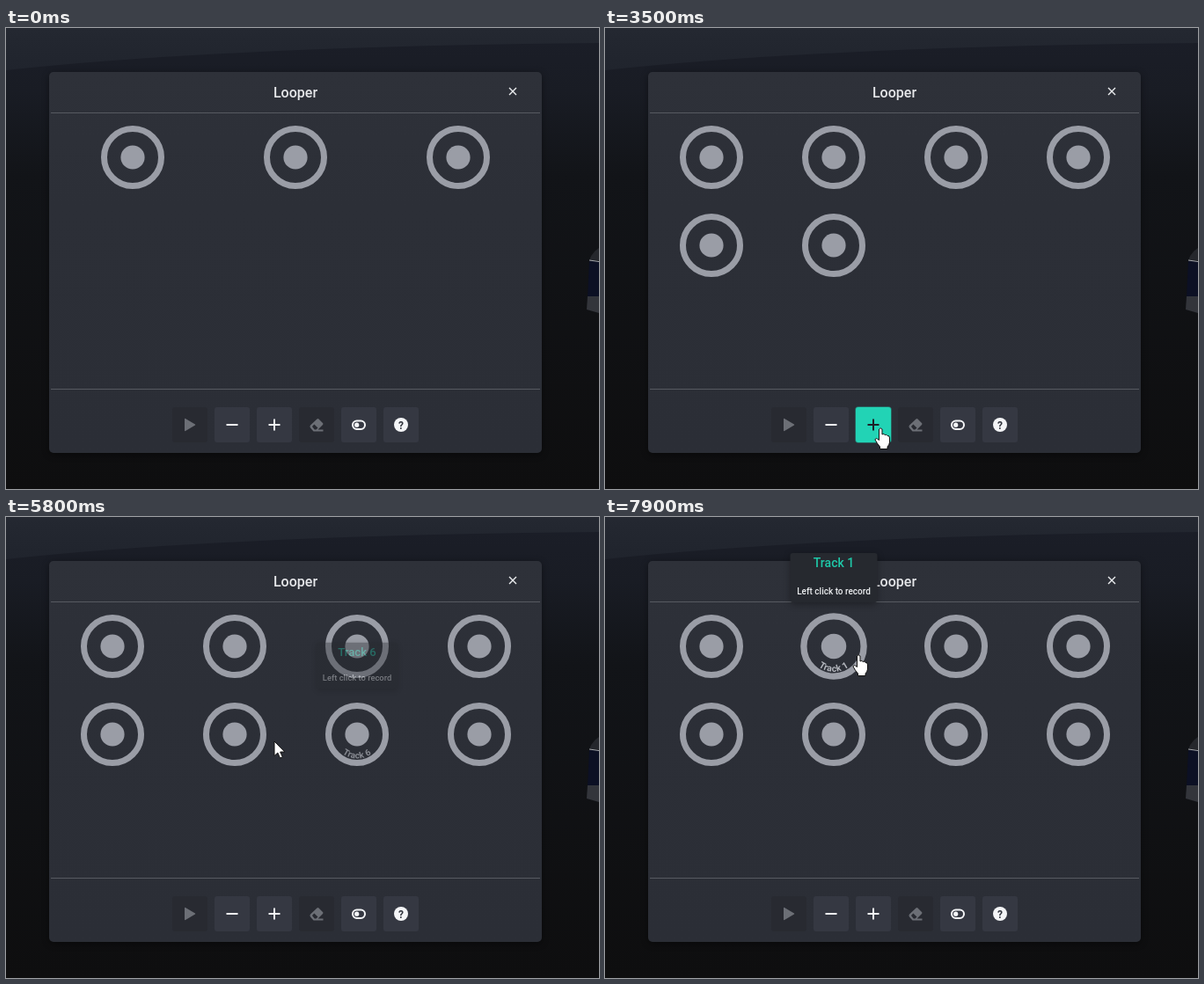
An HTML page for the animation above (8 s loop, 674 by 524 pixels).

```html
<!DOCTYPE html>
<html lang="en">
<head>
<meta charset="utf-8">
<title>Looper</title>
<style>
  html, body { margin: 0; width: 100%; height: 100%; overflow: hidden; background: #0f1011; }
  svg { display: block; width: 674px; height: 524px; font: 500 14px Roboto, sans-serif; }
  text { text-anchor: middle; }
  .ring { stroke: #9a9da6; stroke-width: 7; fill: none; }
  .label { font-size: 10px; font-weight: 700; letter-spacing: .3px; fill: #b4b7be; }
  .icon { stroke: #f4f5f7; stroke-width: 2; fill: none; }
  .off { fill: #6c6f76; }
</style>
</head>
<body>
<svg viewBox="0 0 674 524">
  <defs>
    <linearGradient id="sky" x2="0" y2="1">
      <stop stop-color="#242831"/><stop offset="1" stop-color="#20242d"/>
    </linearGradient>
    <linearGradient id="floor" x2="0" y2="1">
      <stop stop-color="#1b1e28"/><stop offset=".14" stop-color="#191c24"/>
      <stop offset=".32" stop-color="#121418"/><stop offset="1" stop-color="#0e0e0f"/>
    </linearGradient>
    <linearGradient id="panel" x2="0" y2="1">
      <stop stop-color="#2e3139"/><stop offset=".35" stop-color="#2c2f37"/><stop offset="1" stop-color="#2b2e36"/>
    </linearGradient>
    <filter id="soft" x="-20%" y="-20%" width="140%" height="140%"><feGaussianBlur stdDeviation="4"/></filter>
    <path id="arc" d="M-27.5 0A27.5 27.5 0 0 0 27.5 0"/>
  </defs>

  <rect width="674" height="524" fill="url(#floor)"/>
  <path d="M0 0H674V17Q250 21 0 48Z" fill="url(#sky)"/>
  <path d="M674 250Q666 255 663 264H674Z" fill="#25272c"/>
  <path d="M663 265H674V306H661Z" fill="#0c1024"/>
  <path d="M661 305H674V324L660 320Z" fill="#33353b"/>
  <path d="M663 264L674 265.500" stroke="#a9abb0"/>

  <rect x="49" y="52" width="560" height="433" rx="5" opacity=".4" filter="url(#soft)"/>
  <rect x="49" y="50" width="560" height="433" rx="5" fill="url(#panel)"/>
  <path d="M51 96.500H607M51 410.500H607" stroke="#575a61"/>
  <text x="329" y="79" font-size="16" fill="#e6e7ea">Looper</text>
  <path d="M572 68l8 8m0-8l-8 8" stroke="#eceef0" stroke-width="1.400"/>
  <g id="rings"></g>

  <g id="hint">
    <rect x="267" y="402" width="78" height="16" fill="#2b2e36"/>
    <text x="305.500" y="415" fill="#eceef0">Add Track</text>
  </g>
  <g id="buttons"></g>
  <rect id="wave" fill="#22d3b5"/>
  <rect id="plusBg" x="285" y="431" width="40" height="40" rx="3" fill="#22d3b5"/>
  <path d="M203 444.500Q203 443.500 204 444L215 450.500Q215.500 451 215 451.500L204 458Q203 458.500 203 457.500Z" class="off"/>
  <path d="M250.500 451h13" class="icon"/>
  <path id="plus" d="M298.500 451h13m-6.500-6.500v13" class="icon"/>
  <path fill-rule="evenodd" class="off" d="M346 451.500L353.500 444.500Q354.500 443.700 355.500 444.500L360 449Q361 450 360 451L354.500 456.500H360.500V458.500H349.500L346 454.500Q344.800 453 346 451.500ZM350.300 450.400L348 453L350.700 456.500H352.500L354.500 454.500Z"/>
  <rect x="394" y="446.500" width="14" height="9.500" rx="4.700" class="icon" stroke-width="1.800"/>
  <circle cx="398.700" cy="451.200" r="2.600" fill="#f4f5f7"/>
  <circle cx="449" cy="451" r="8" fill="#f4f5f7"/>
  <text x="449" y="455.500" font-size="12" font-weight="700" fill="#30333c">?</text>

  <g id="tips"></g>
  <g id="cursor" stroke="#111" stroke-linejoin="round">
    <path fill="#fff" d="M0 0V16.500L3.800 13L6.500 19L9.300 17.800L6.700 12H11.800Z"/>
    <path fill="#fff" d="M-1.500 1Q0-1.500 2 1V7Q4 5.500 5.200 7.500Q7 6.500 8 8.500Q10.500 8 10.500 11V16Q10 19 8 21V23.500H-.5V21Q-4 17-6 13Q-5.500 10-1.500 13.500Z"/>
    <path fill="none" stroke="#08090b" d="M-3.500-8H-1L0-7L1-8H3.500M0-7V7M-3.500 8H-1L0 7L1 8H3.500"/>
  </g>
</svg>
<script>
const $ = id => document.getElementById(id);
const set = (el, attrs) => { for (const k in attrs) el.setAttribute(k, attrs[k]); };
const clamp = v => Math.max(0, Math.min(1, v));

const LOOP = 8000, STEP = 100;
const clicks = [1680, 2560, 2980, 3470, 3870];
const plusHover = [880, 4230], beam = [6867, 7050];
// track: [pointer enters, pointer leaves]
const hovers = { 7: [4720, 5200], 6: [5330, 5600], 5: [5850, 6250], 4: [6380, 6867], 1: [7420, 9000] };
// time, x, y
const path = [
  [100, 600, 506], [300, 656, 400], [500, 620, 267], [700, 440, 360], [900, 316, 451], [1000, 313, 455],
  [4150, 313, 455], [4300, 396, 403], [4700, 540, 285], [4900, 553, 258], [5100, 525, 254], [5400, 410, 250],
  [5600, 358, 252], [5800, 305, 255], [6000, 268, 258], [6300, 198, 257], [6500, 132, 256], [6700, 128, 220],
  [6900, 132, 170], [7100, 168, 150], [7400, 232, 150], [7700, 282, 155], [7900, 288, 157]
];

const within = (t, [a, b]) => t >= a && t < b;
// rises after the start, falls after the end
const pulse = (t, [a, b], rise, fall) => Math.min(clamp((t - a) / rise), 1 - clamp((t - b) / fall));

$('buttons').innerHTML = [0, 1, 1, 0, 1, 1].map((on, i) =>
  `<rect x="${189 + 48 * i}" y="431" width="40" height="40" rx="3" fill="${on ? '#353842' : '#282a31'}"/>`).join('');

$('rings').innerHTML = Array.from({ length: 8 }, (_, i) =>
  `<g><circle class="ring" r="32.500"/><circle r="13.600" fill="#9a9da6"/>
   <text class="label"><textPath href="#arc" startOffset="50%">Track ${i}</textPath></text></g>`).join('');
const rings = [...$('rings').children];

const tipIds = Object.keys(hovers);
$('tips').innerHTML = tipIds.map(i =>
  `<g><rect x="-49" y="-26" width="98" height="56" rx="3" opacity=".35" filter="url(#soft)"/>
   <rect x="-49.500" y="-28" width="99" height="56" rx="3" fill="#26292f"/>
   <text y="-12" fill="#1fc9a9">Track ${i}</text>
   <text y="18.500" font-size="10" fill="#eceef0">Left click to record</text></g>`).join('');
const tips = [...$('tips').children];

function place(i, wide) {
  return wide ? [121 + 139 * (i % 4), i < 4 ? 147 : 247] : [144 + 185 * i, 147];
}

function pointer(t) {
  const n = path.findIndex(p => p[0] > t);
  if (n < 0) return path[path.length - 1].slice(1);
  const a = path[Math.max(0, n - 1)], b = path[n];
  const k = clamp((t - a[0]) / (b[0] - a[0] || 1));
  return [a[1] + (b[1] - a[1]) * k, a[2] + (b[2] - a[2]) * k];
}

function draw(t) {
  const wide = t >= clicks[0] + 100;
  rings.forEach((g, i) => {
    const [x, y] = place(i, wide), h = hovers[i];
    const shown = i < 3 ? 1 : clamp((t - clicks[i - 3] - 100) / 150);
    const grow = h ? 1 + .05 * pulse(t, h, 150, 60) : 1;
    set(g, { transform: `translate(${x} ${y}) scale(${grow})`, opacity: shown });
    set(g.lastElementChild, { opacity: h ? pulse(t, h, 150, 600) : 0 });
  });

  tips.forEach((g, n) => {
    const i = tipIds[n], [x, y] = place(i, true), a = pulse(t, hovers[i], 200, 330);
    set(g, { transform: `translate(${x} ${y - 78}) scale(${.9 + .1 * a})`, opacity: a });
  });

  const teal = pulse(t, plusHover, 150, 350);
  set($('plusBg'), { opacity: teal });
  set($('plus'), { style: `stroke:${teal > .3 ? '#1d2128' : '#f4f5f7'}` });
  set($('hint'), { opacity: pulse(t, [900, 1750], 150, 300) });

  const age = t - Math.max(0, ...clicks.filter(c => c <= t));
  const live = t >= clicks[0] && age < 400, spread = 6 * clamp(age / 240);
  set($('wave'), {
    x: 285 - spread, y: 431 - spread, width: 40 + 2 * spread, height: 40 + 2 * spread,
    rx: 3 + spread, opacity: live ? .5 * (1 - age / 400) ** 2 : 0
  });

  const onRing = tipIds.some(i => within(t, hovers[i]));
  const kind = within(t, beam) ? 2 : onRing || within(t, plusHover) ? 1 : 0;
  set($('cursor'), { transform: `translate(${pointer(t)})`, opacity: t >= 100 ? 1 : 0 });
  [...$('cursor').children].forEach((el, i) => set(el, { visibility: i === kind ? 'visible' : 'hidden' }));
}

const start = performance.now();
function tick() {
  const t = (performance.now() - start) % LOOP;
  draw(Math.floor(t / STEP) * STEP);
  requestAnimationFrame(tick);
}
tick();
</script>
</body>
</html>
```
